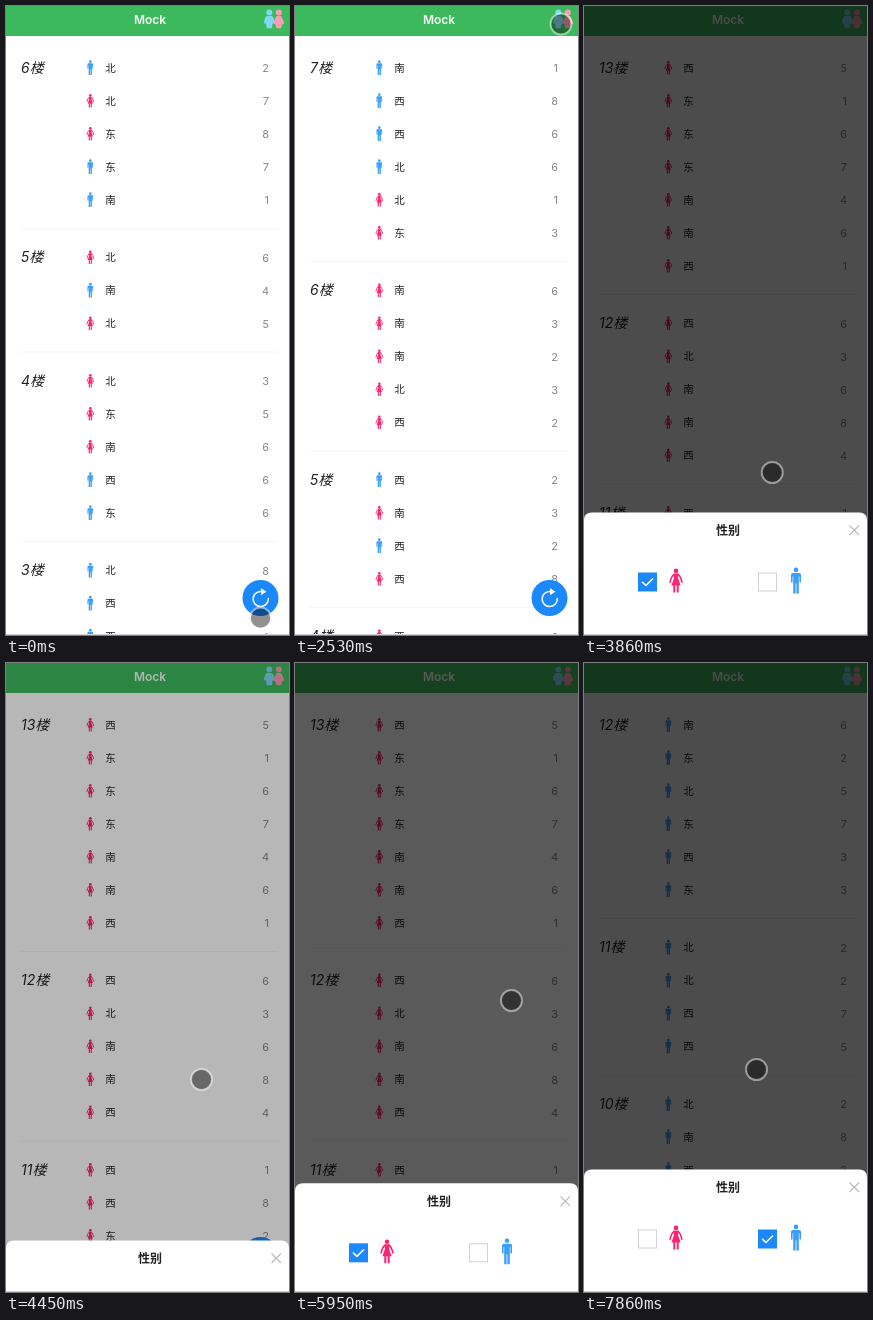
An HTML page that plays this animation: 283x629 px, repeating every 8000 ms.

```html
<!DOCTYPE html>
<html lang="zh">
<head>
<meta charset="utf-8">
<title>Mock</title>
<style>
html, body { margin: 0; width: 100%; height: 100%; overflow: hidden; background: #fff; }
svg { display: block; width: 100vw; height: 100vh; }
text { font-family: Inter, "Noto Sans CJK SC", "Noto Sans CJK", sans-serif; }
.floor { font-size: 14px; font-style: italic; fill: #222; }
.side { font-size: 10.5px; fill: #222; }
.count { font-size: 11px; fill: #888; text-anchor: end; }
.title { font-size: 12px; font-weight: 600; text-anchor: middle; }
</style>
</head>
<body>
<svg viewBox="0 0 283 629" preserveAspectRatio="none">
  <defs>
    <g id="m" fill="#3b9ff8">
      <circle cy="-10.6" r="2.3"/>
      <path d="M-3.2-7.6H3.2Q5-7.6 5-5.6V1.6Q4.2 3 3.4 1.6V-4H2.8V13H.4V3H-.4V13H-2.8V-4H-3.4V1.6Q-4.2 3-5 1.6V-5.6Q-5-7.6-3.2-7.6Z"/>
    </g>
    <g id="f" fill="#fb2470">
      <circle cy="-9.6" r="2.3"/>
      <path d="M-2.6-6.8H2.6L2-2.5 4.6 5H2.7V12H.7V5H-.7V12H-2.7V5H-4.6L-2-2.5Z"/>
      <path d="M-5.9 1.6Q-4.6-4-2.3-6H2.3Q4.6-4 5.9 1.6" fill="none" stroke="#fb2470" stroke-width="1.6" stroke-linecap="round"/>
    </g>
  </defs>
  <rect width="283" height="629" fill="#fff"/>
  <g id="list"></g>
  <circle cx="254.5" cy="592" r="18" fill="#1b88fb"/>
  <path d="M254.5 585.4A7.6 7.6 0 1 0 262.3 592.6" fill="none" stroke="#fff" stroke-width="1.5" stroke-linecap="round"/>
  <path d="M255 582L260.3 585.7 255 589.2Z" fill="#fff"/>
  <rect width="283" height="30" fill="#3db95d"/>
  <text class="title" x="144" y="17.6" fill="#f4fff6">Mock</text>
  <g fill="#80d8f5">
    <circle cx="263.3" cy="6.4" r="3"/>
    <path d="M260.8 10H265.8Q268.6 11.5 268.4 17.5H266.6L265.8 22.3H260.8L260 17.5H258.2Q258 11.5 260.8 10Z"/>
  </g>
  <g fill="#fa9db4">
    <circle cx="272.8" cy="6.4" r="3"/>
    <path d="M271 10H274.6Q276.4 11 278.2 17.5L276 18.6 275.2 22.3H270.4L269.6 18.6 267.4 17.5Q269.2 11 271 10Z"/>
  </g>
  <rect id="mask" width="283" height="629"/>
  <g id="sheet">
    <path d="M0 760V514.5Q0 506.5 8 506.5H275Q283 506.5 283 514.5V760Z" fill="#fff"/>
    <text class="title" x="144" y="528.9" fill="#222">性别</text>
    <path d="M265.5 519.5L275 529M275 519.5L265.5 529" stroke="#bbb" stroke-width="1.2"/>
    <g id="boxes"></g>
    <use href="#f" x="92" y="574.5"/>
    <use href="#m" x="212" y="574.5"/>
  </g>
  <rect y="628" width="283" height="1" fill="#d2d2d2"/>
  <g id="pointer">
    <circle r="10" fill="#000" fill-opacity=".43"/>
    <circle r="10.5" fill="none" stroke="#fff" stroke-opacity=".45" stroke-width="2"/>
  </g>
</svg>
<script>
const LOOP = 8000, STEPS = 54;
const $ = id => document.getElementById(id);

// Floor, then one entry per row: sex, side, count
const first = "6:m北2f北7f东8m东7m南1|5:f北6m南4f北5|4:f北3f东5f南6m西6m东6|3:m北8m西3m西4";
const mixed = "7:m南1m西8m西6m北6f北1f东3|6:f南6f南3f南2f北3f西2|5:m西2f南3m西2f西8|4:f西6";
const women = "13:f西5f东1f东6f东7f南4f南6f西1|12:f西6f北3f南6f南8f西4|11:f西1f西8f东2f北4";
const men = "12:m南6m东2m北5m东7m西3m东3|11:m北2m北2m西7m西5|10:m北2m南8m西2m东4";

function mock(seed, top) {
  const rnd = n => (seed = seed * 16807 % 2147483647) % n;
  return [0, 1, 2, 3].map(i => {
    let rows = "";
    for (let n = 4 + rnd(3); n--;) rows += "mf"[rnd(2)] + "东南西北"[rnd(4)] + (1 + rnd(8));
    return top - i + ":" + rows;
  }).join("|");
}

function drawList(data) {
  let y = 62, out = "";
  for (const group of data.split("|")) {
    const [floor, rows] = group.split(":");
    out += `<text class="floor" x="15" y="${y + 4.8}">${floor}楼</text>`;
    for (const [, sex, side, count] of rows.matchAll(/(.)(.)(\d)/g)) {
      out += `<use href="#${sex}" transform="translate(84.3 ${y - .3}) scale(.57)"/>
        <text class="side" x="99.3" y="${y + 3.8}">${side}</text>
        <text class="count" x="263" y="${y + 4}">${count}</text>`;
      y += 33;
    }
    out += `<path d="M15 ${y - 4.5}H272" stroke="#f4f4f4"/>`;
    y += 24.5;
  }
  return out;
}

const drawBox = (x, on) => `<g transform="translate(${x} 566.5)">` + (on
  ? '<rect width="19" height="19" fill="#1b88fb"/><path d="M4 9.3L8 13 15 6" fill="none" stroke="#fff" stroke-width="1.6"/>'
  : '<rect x=".5" y=".5" width="18" height="18" fill="#fff" stroke="#d2d2d2"/>') + "</g>";

const scene = (at, data, sexes) => ({
  at, list: drawList(data),
  boxes: drawBox(54, sexes.includes("f")) + drawBox(174, sexes.includes("m"))
});
const scenes = [
  scene(0, first, "fm"), scene(5, mock(4711, 9), "fm"), scene(10, mixed, "fm"),
  scene(26, women, "f"), scene(46, mock(9173, 12), "fm"), scene(53, men, "m")
];

// Stops of the pointer: step, x, y
const stops = [
  [0, 254.5, 612], [10, 254.5, 611], [12, 244, 55.5], [17, 266, 18],
  [19, 231.5, 353], [25, 183, 576], [27, 190, 430], [30, 195.5, 416.5],
  [33, 236, 122], [36, 262.5, 27], [39, 262.5, 27], [40, 216.5, 337.5],
  [46, 183, 577], [52, 66, 579], [53, 172.5, 406.5]
];

const easeOut = u => 1 - (1 - u) ** 2;
const ramp = (k, from, length) => easeOut(Math.min(1, Math.max(0, (k - from) / length)));

function pointerAt(k) {
  const i = stops.findIndex(s => s[0] > k);
  if (i < 0) return stops[stops.length - 1].slice(1);
  const [t, x, y] = stops[i - 1], [t2, x2, y2] = stops[i];
  const u = ramp(k, t, t2 - t);
  return [x + (x2 - x) * u, y + (y2 - y) * u];
}

let shown;
function draw(t) {
  // The screen refreshes in even steps
  const k = Math.floor(t % LOOP / LOOP * STEPS);
  const now = scenes.filter(s => s.at <= k).pop();
  if (now !== shown) {
    $("list").innerHTML = now.list;
    $("boxes").innerHTML = now.boxes;
    shown = now;
  }
  const open = ramp(k, 17, 2) - ramp(k, 28.95, 3) + ramp(k, 38.67, 2);
  const smooth = open * open * (3 - 2 * open);
  $("mask").setAttribute("opacity", .35 * (open + smooth));
  $("sheet").setAttribute("transform", `translate(0 ${123 * (1 - open)})`);
  $("pointer").setAttribute("transform", `translate(${pointerAt(k)})`);
}

const start = performance.now();
function tick() {
  draw(performance.now() - start);
  requestAnimationFrame(tick);
}
tick();
</script>
</body>
</html>
```
